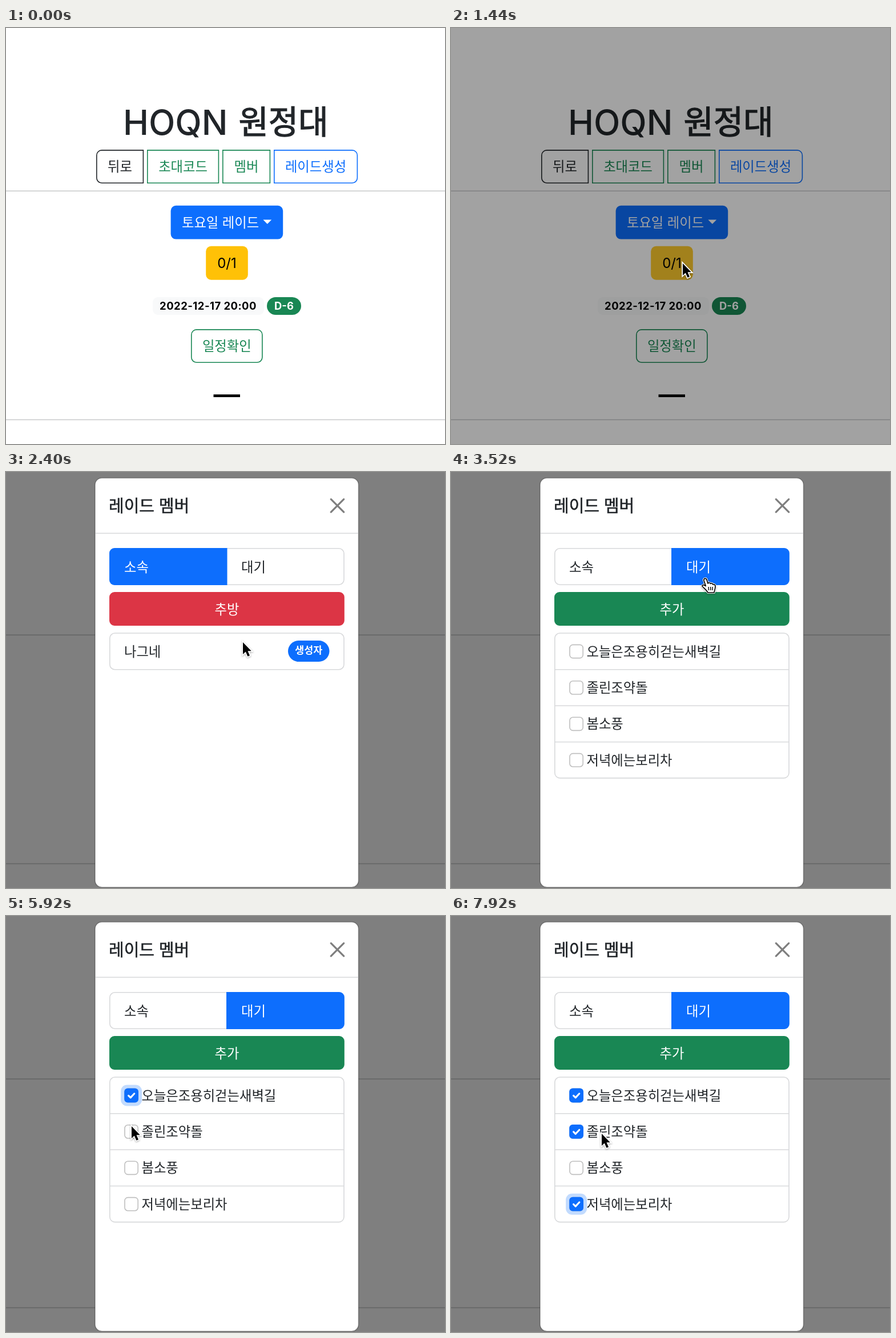
Write an HTML page that moves like this. It is 769 px wide and 728 px high and loops after 8000 ms.

```html
<!DOCTYPE html>
<html lang="ko">
<head>
<meta charset="utf-8">
<style>
html, body { margin: 0; width: 100%; height: 100%; overflow: hidden; background: #fff; }
svg { display: block; width: 769px; height: 728px; font-family: Inter, 'Noto Sans CJK KR', 'Noto Sans CJK', sans-serif; }
</style>
</head>
<body>
<svg id="stage" viewBox="0 0 769 728"></svg>
<script>
const INK = '#212529', BLUE = '#0d6efd', GREEN = '#198754', LINE = '#d8d9db';
const CLICK = { open: 1332, tab: 3200 };
const MODAL_START = 1510;
const LOOP = 8000;

// Vertically centred text; "bold" thickens the strokes slightly
const text = (s, x, cy, { size = 23.3, fill = INK, weight = 400, anchor = 'start', gap = 0, bold = 0 } = {}) =>
  `<text x="${x}" y="${cy + size * .37}" font-size="${size}" fill="${fill}" font-weight="${weight}" text-anchor="${anchor}" letter-spacing="${gap}" stroke="${fill}" stroke-width="${bold}">${s}</text>`;
const mid = (s, x, cy, o) => text(s, x, cy, { anchor: 'middle', ...o });

// Box with separate left and right corner radii
const box = (x1, y1, x2, y2, l, r, attrs) =>
  `<path d="M${x1 + l} ${y1}H${x2 - r}a${r} ${r} 0 0 1 ${r} ${r}V${y2 - r}a${r} ${r} 0 0 1 ${-r} ${r}H${x1 + l}a${l} ${l} 0 0 1 ${-l} ${-l}V${y1 + l}a${l} ${l} 0 0 1 ${l} ${-l}z" ${attrs}/>`;
const outline = c => `fill="none" stroke="${c}" stroke-width="1.6"`;
const rule = (x1, x2, y, c) => `<path d="M${x1} ${y}H${x2}" stroke="${c}" stroke-width="1.5"/>`;

const ghostButton = (s, x1, x2, y, l, r, c) =>
  box(x1 + .8, y + .9, x2 - .6, y + 58.2, l, r, outline(c)) + mid(s, (x1 + x2) / 2, y + 29.3, { fill: c });

const page =
  text('HOQN', 205, 164.5, { size: 60.4, weight: 500 }) +
  text('원정대', 407.5, 164, { size: 56.9, weight: 500, bold: 1.3 }) +
  ghostButton('뒤로', 158, 241, 213, 9, 0, INK) +
  ghostButton('초대코드', 247, 373, 213, 0, 0, GREEN) +
  ghostButton('멤버', 379, 463, 213, 0, 0, GREEN) +
  ghostButton('레이드생성', 469, 616, 213, 0, 9, BLUE) +
  rule(0, 769, 285.2, '#c8c9ca') + rule(0, 769, 685.5, '#c8c9ca') +
  box(288.6, 310.8, 485.2, 369.6, 9, 9, `fill="${BLUE}"`) +
  text('토요일 레이드', 308, 340, { fill: '#fff' }) +
  '<path d="M450.4 335.6h14.8l-7.4 7.3z" fill="#fff"/>' +
  box(350.2, 381.8, 423.8, 440.7, 9, 9, 'id="count"') +
  mid('0/1', 387, 411.2, { size: 24, fill: '#000' }) +
  box(257, 471, 452, 502, 9, 9, 'fill="#f8f9fa"') +
  mid('2022-12-17 20:00', 354, 486.5, { size: 18.4, weight: 700, fill: '#000', gap: .5 }) +
  box(457, 471, 517, 502, 15.5, 15.5, `fill="${GREEN}"`) +
  mid('D-6', 487, 486.5, { size: 18.4, weight: 700, fill: '#fff' }) +
  ghostButton('일정확인', 324, 449.5, 527, 9, 9, GREEN) +
  '<path d="M363.5 641.3h46.5v4.7h-46.5z"/>';

const tabs = waiting =>
  box(181.8, 133.8, 592, 197.2, 9, 9, outline(LINE)) +
  (waiting ? box(386, 133, 592.8, 198, 0, 9, `fill="${BLUE}"`) : box(181, 133, 387.5, 198, 9, 0, `fill="${BLUE}"`)) +
  text('소속', 207, 166, { fill: waiting ? INK : '#fff' }) +
  text('대기', 412, 166, { fill: waiting ? '#fff' : INK });

const wideButton = (id, s) => box(181, 210, 592.8, 269, 9, 9, `id="${id}"`) + mid(s, 387, 240, { fill: '#fff' });

const rowY = i => 314 + i * 63.4;
const names = ['오늘은조용히걷는새벽길', '졸린조약돌', '봄소풍', '저녁에는보리차'];
const row = (name, i) => {
  const y = rowY(i);
  return (i ? rule(182, 592, y - 31.7, LINE) : '') +
    `<g transform="translate(219.6 ${y})">
      <rect id="halo${i}" x="-18.5" y="-18.5" width="37" height="37" rx="11" fill="#c2dbfe"/>
      <rect x="-11.6" y="-11.6" width="23.2" height="23.2" rx="5.5" fill="#fff" stroke="#bfbfbf" stroke-width="1.6"/>
      <g id="tick${i}"><rect x="-12.4" y="-12.4" width="24.8" height="24.8" rx="6" fill="${BLUE}"/>
      <path d="M-5 .3l3.6 3.6L5.2 -3.2" fill="none" stroke="#fff" stroke-width="3.1" stroke-linecap="round" stroke-linejoin="round"/></g>
    </g>` + text(name, 237.5, y);
};

const modal =
  box(156, 10.5, 617.5, 726.7, 12, 12, 'fill="#fff" stroke="#000" stroke-opacity=".32" stroke-width="1.6"') +
  text('레이드 멤버', 180, 59, { size: 29, weight: 500, bold: .6 }) +
  '<path d="M569.3 47.7l22.4 22.4m0-22.4l-22.4 22.4" stroke="#7f7f7f" stroke-width="3.3" stroke-linecap="round"/>' +
  rule(157, 617, 107.2, LINE) +
  '<g id="joined">' + tabs(false) + wideButton('kick', '추방') +
  box(181.8, 282, 592, 345.7, 9, 9, outline(LINE)) + text('나그네', 207, 314) +
  box(494, 295, 566.5, 332, 18.5, 18.5, `fill="${BLUE}"`) +
  mid('생성자', 530.3, 311.5, { size: 17.4, weight: 700, fill: '#fff' }) + '</g>' +
  '<g id="waiting">' + tabs(true) + wideButton('add', '추가') +
  box(181.8, 282, 592, 535.6, 9, 9, outline(LINE)) + names.map(row).join('') + '</g>';

const handPath = 'M-4 4C-5 0 0 -1 1 2.5L3 9C4 7 7 7.5 7.5 9.5C9 8 11.5 9 11.8 11C13.5 10 16 11 16 14C16 19 14.5 20.5 14 25H3C1 21 -3 18 -6.5 14.5C-8 12 -5 10.5 -2.5 12.5L-.8 13.5Z';
const cursor = `<g id="cursor" style="filter:drop-shadow(0 1.5px 1.5px #0005)">
  <path id="arrow" d="M0 0V21L4.8 16.6L8.4 24.8L12 23.2L8.5 15.3H14.8Z" stroke="#fff" stroke-width="3.4" paint-order="stroke"/>
  <g id="hand" stroke-linejoin="round"><path d="${handPath}" fill="#fff" stroke="#fff" stroke-width="3.6"/>
  <path d="${handPath}" fill="#fff" stroke="#000" stroke-width="1.7"/>
  <path d="M4 15l.6 6M7.6 15l.3 6M11.2 15l-.2 6" stroke="#000" stroke-width="1.4"/></g></g>`;

document.getElementById('stage').innerHTML = page +
  '<rect id="shade" width="769" height="728"/>' + `<g id="modal">${modal}</g>` + cursor;

const $ = id => document.getElementById(id);
const set = (id, name, value) => $(id).setAttribute(name, value);
const show = (id, on) => set(id, 'visibility', on ? 'inherit' : 'hidden');
const clamp = v => Math.min(1, Math.max(0, v));

// Pointer stops: time, x, y
const stops = [
  [80, 597, 732], [1050, 406, 412], [1560, 406, 412], [2300, 415, 298], [2450, 415, 298],
  [3000, 447, 186], [3600, 447, 186], [4750, 219, 312], [5350, 219, 312], [5880, 220, 368],
  [6200, 220, 368], [7150, 221, 504], [7350, 221, 504], [7900, 264, 381]
];
// Checks: time, row
const checks = [[5200, 0], [6080, 1], [7280, 3]];

function pointer(t) {
  const i = stops.findIndex(s => s[0] > t);
  if (i <= 0) return (i ? stops[stops.length - 1] : stops[0]).slice(1);
  const [a, b] = [stops[i - 1], stops[i]];
  const p = (t - a[0]) / (b[0] - a[0]), e = p * p * (3 - 2 * p);
  return [a[1] + (b[1] - a[1]) * e, a[2] + (b[2] - a[2]) * e];
}

function draw(t) {
  const [x, y] = pointer(t);
  const over = (x1, y1, x2, y2) => x > x1 && x < x2 && y > y1 && y < y2;
  const inModal = t > MODAL_START;
  const onCount = !inModal && over(350, 382, 424, 441);
  const onTabs = inModal && over(181, 133, 593, 198);
  const onWide = inModal && over(181, 210, 593, 269);

  set('count', 'fill', onCount ? '#ffca2c' : '#ffc107');
  set('kick', 'fill', onWide ? '#bb2d3b' : '#dc3545');
  set('add', 'fill', onWide ? '#157347' : GREEN);

  set('shade', 'opacity', .5 * clamp((t - CLICK.open) / 150));
  const slide = clamp((t - MODAL_START) / 300);
  set('modal', 'opacity', clamp((t - MODAL_START) / 150));
  set('modal', 'transform', `translate(0 ${-77 * (1 - slide) ** 1.7})`);

  const waiting = t >= CLICK.tab;
  show('joined', !waiting);
  show('waiting', waiting);
  const done = checks.filter(c => t >= c[0]).map(c => c[1]);
  names.forEach((_, i) => {
    show('tick' + i, done.includes(i));
    show('halo' + i, done[done.length - 1] === i);
  });

  const hand = onCount && t < CLICK.open || onTabs || onWide;
  show('cursor', t >= stops[0][0]);
  show('hand', hand);
  show('arrow', !hand);
  set('cursor', 'transform', `translate(${x} ${y})`);
}

const start = performance.now();
function tick() {
  draw((performance.now() - start) % LOOP);
  requestAnimationFrame(tick);
}
tick();
</script>
</body>
</html>
```
